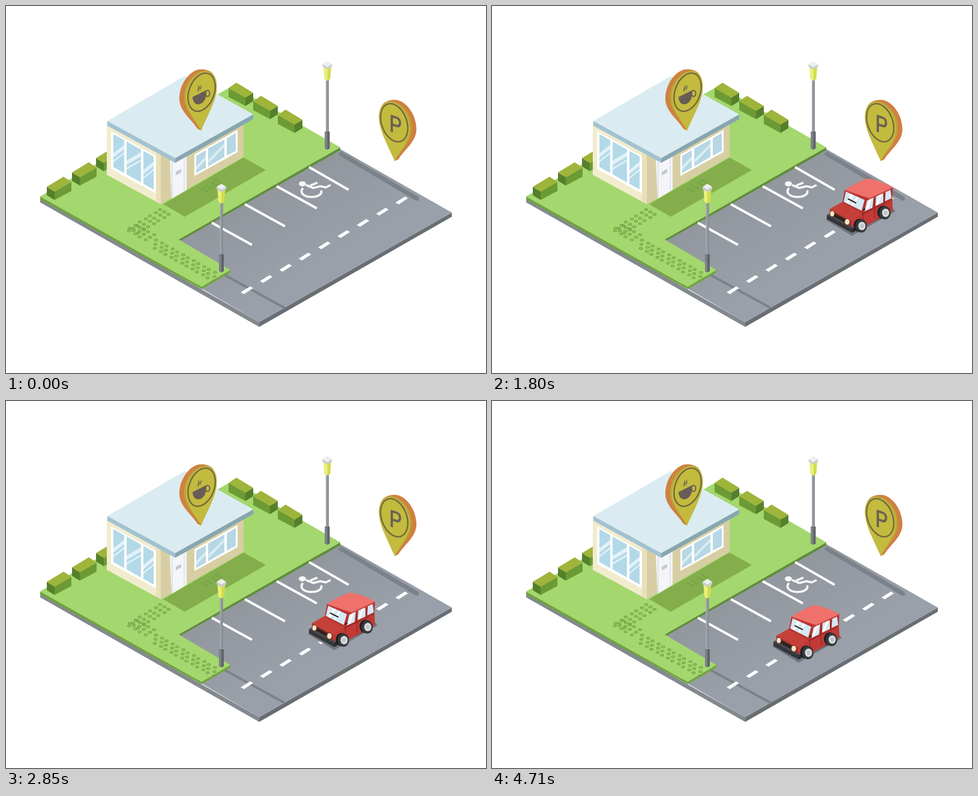
An HTML page for the animation above (4810 ms loop, 800 by 613 pixels).

```html
<!DOCTYPE html>
<html lang="en">
<head>
<meta charset="utf-8">
<title>Parking lot</title>
<style>
  html, body { margin: 0; width: 100%; height: 100%; overflow: hidden; background: #fff; }
  svg { display: block; width: 100%; height: 100%; }
</style>
</head>
<body>
<svg viewBox="0 0 800 613" preserveAspectRatio="none">
  <defs>
    <linearGradient id="asphalt" gradientUnits="userSpaceOnUse" x1="420" y1="310" x2="500" y2="450">
      <stop offset="0" stop-color="#92979e"/>
      <stop offset="1" stop-color="#9aa0a9"/>
    </linearGradient>
    <linearGradient id="pole">
      <stop offset="0" stop-color="#a9afb5"/>
      <stop offset="1" stop-color="#7d838a"/>
    </linearGradient>
    <g id="hedge">
      <path fill="#6c9a35" d="M0 0 28 16V30L0 15Z"/>
      <path fill="#557f2b" d="M28 16 41 8V22L28 30Z"/>
      <path fill="#9fb43a" d="M0 0 13 -9 41 8 28 16Z"/>
    </g>
    <g id="lamp">
      <path fill="#5f646a" d="M-4 113 0 111 4 113V141L0 143-4 141Z"/>
      <path fill="#7d8288" d="M-4 113 0 115V143L-4 141Z"/>
      <rect x="-2.5" y="25" width="5" height="88" fill="url(#pole)"/>
      <path fill="#e9f07a" d="M-6.5 4 0 8V28L-5 25Z"/>
      <path fill="#d3dc4f" d="M6.5 4 0 8V28L5 25Z"/>
      <path fill="#c9ccd0" d="M-8 0 0 5 8 0V4L0 9-8 4Z"/>
      <path fill="#eceef0" d="M-8 0 0-5 8 0 0 5Z"/>
    </g>
    <g id="pin">
      <path fill="#cf8140" d="M325 208 319 205C309 189 290 176 289 157C288 131 306 108 322 106C331 105 339 107 345 113Z"/>
      <path fill="#bda63a" d="M325 208C318 193 298 177 297 155C296 128 316 107 334 108C347 109 353 123 351 141C349 160 335 185 325 208Z"/>
      <path fill="#c3bb3e" d="M325 208C318 193 301 177 300 155C299 130 318 109 334 110C347 111 353 124 351 141C349 160 335 185 325 208Z"/>
      <ellipse cx="326" cy="144" rx="21" ry="33" transform="rotate(20 326 144)" fill="none" stroke="#74683f" stroke-width="2.4"/>
    </g>
  </defs>

  <!-- slab -->
  <path fill="#83898e" d="M57 320 422 528V536L57 328Z"/>
  <path fill="#696e73" d="M422 528 743 345V352L422 536Z"/>
  <path fill="url(#asphalt)" d="M557 239 743 345 422 528 326 472 240 390Z"/>
  <path fill="#7b8289" d="M558 243 688 319V325L683 325 553 248Z"/>
  <path fill="none" stroke="#7b8289" stroke-width="4" d="M362 448 464 504"/>

  <!-- lawn -->
  <path fill="#6fa53b" d="M57 318 326 469 374 441V445L326 473 57 323Z"/>
  <path fill="#5f8d39" d="M557 236 288 390 291 392 557 241Z"/>
  <path fill="#a4d76e" d="M57 318 378 133 557 236 288 390 374 441 326 469Z"/>
  <path fill="#84ae4c" d="M262 331 396 253 433 274 298 352Z"/>
  <g id="stones" fill="none" stroke="#74a548" stroke-width="1.4"></g>

  <use href="#hedge" transform="matrix(-1 0 0 1 109 294)"/>
  <use href="#hedge" transform="matrix(-1 0 0 1 151 270)"/>
  <use href="#hedge" transform="matrix(-1 0 0 1 191 246)"/>
  <use href="#hedge" x="371" y="137"/>
  <use href="#hedge" x="412" y="159"/>
  <use href="#hedge" x="453" y="182"/>

  <!-- cafe -->
  <path fill="#f2ecce" d="M168 194 258 244V331L168 282Z"/>
  <path fill="#d7cfa3" d="M258 244 396 190V252L258 331Z"/>
  <path fill="#e8e0b9" d="M250 246 258 250V331L250 327Z"/>
  <path fill="#fff" d="M175 209 250 251V313L175 272Z"/>
  <g id="panes" fill="#b3d9e8"></g>
  <path fill="#fff" d="M314 248 386 207V244L314 284Z"/>
  <path fill="#b7d7e5" d="M317 250 333 241V270L317 279ZM337 238 364 223V252L337 268ZM368 221 383 212V242L368 250Z"/>
  <path fill="#dceef4" d="M317 268 333 251V257L317 274ZM338 256 364 230V235L338 262Z"/>
  <path fill="#f4f5f8" d="M273 258 301 245V307L276 322Z"/>
  <path fill="none" stroke="#cfd2dc" d="M277 260V320M297 250V308"/>
  <path fill="#c3c8d2" d="M283 277 292 272V278L283 283Z"/>
  <path fill="#a3c2d1" d="M169 192 282 254V262L169 200Z"/>
  <path fill="#87a6b1" d="M282 254 412 181V189L282 262Z"/>
  <path fill="#daecf1" d="M169 192 298 117 412 181 282 254Z"/>

  <!-- markings -->
  <path fill="none" stroke="#fff" stroke-width="4" d="M505 269 571 307M451 301 518 338M398 331 465 368M343 362 410 399"/>
  <g id="dashes" fill="#fff"></g>
  <g fill="none" stroke="#f7f7f7" stroke-width="3.6" stroke-linejoin="round">
    <ellipse cx="494" cy="297" rx="6" ry="4.2" fill="#f7f7f7" stroke="none"/>
    <path d="M500 299 512 304 524 301 533 303 541 299M507 300 519 295"/>
    <path d="M495 304C488 312 497 319 509 319C520 319 528 314 525 308"/>
  </g>

  <use href="#lamp" x="535.5" y="97"/>
  <use href="#lamp" x="359" y="302"/>

  <!-- pins -->
  <use href="#pin"/>
  <g fill="#685d56">
    <path d="M311 152 333 141C335 152 331 160 325 163C317 167 311 161 311 152Z"/>
    <ellipse cx="336" cy="146" rx="3.6" ry="5" fill="none" stroke="#685d56" stroke-width="2"/>
    <path d="M320 144C317 139 323 136 320 132C326 135 320 140 320 144ZM323 142C322 137 326 135 324 131C328 135 324 138 323 142Z"/>
  </g>
  <use href="#pin" transform="matrix(-1 0 0 1 973 51)"/>
  <text transform="matrix(.78 .25 0 1 649.5 212)" text-anchor="middle" font-family="'Liberation Sans', Arial, sans-serif" font-size="40" fill="#6b6056" stroke="#6b6056">P</text>

  <!-- car -->
  <g id="car" visibility="hidden">
    <path fill="#70767c" d="M467 410 511 437 583 396 570 378 495 392Z"/>
    <path fill="#2c2c30" d="M509 410 575 382V400L514 428Z"/>
    <path fill="#c13a35" d="M508 410 527 396 578 372 579 395 567 402 536 419 511 426Z"/>
    <path fill="#9d2c2b" d="M528 399 578 374V377L528 402Z"/>
    <path fill="#c6403a" d="M474 392 495 380 528 397 510 412Z"/>
    <path fill="#a83029" d="M474 392 510 412V425L474 405Z"/>
    <path fill="#2b2422" d="M480 398 500 409V416L480 405Z"/>
    <path fill="#b9322f" d="M499 360 540 374 579 356 578 376 528 399 495 382Z"/>
    <path fill="#d3e9f5" d="M501 363 532 377 527 395 497 380Z"/>
    <path fill="#fff" d="M509 367 514 369 505 383 501 381ZM519 371 522 373 512 387 510 386Z"/>
    <path fill="#d3e9f5" d="M536 378 547 373 545 390 532 396ZM551 371 563 366V381L550 387ZM567 364 575 360 577 374 566 379Z"/>
    <path fill="#fff" d="M540 376 544 374 537 393 533 395ZM557 368 561 367 554 385 551 386Z"/>
    <path fill="none" stroke="#85211f" d="M529 398 531 416M548 374 549 408M565 366V384"/>
    <path fill="#ee716c" d="M499 360C510 353 526 344 537 341C551 343 570 350 579 356C568 364 554 370 540 375C526 370 512 365 499 360Z"/>
    <path fill="none" stroke="#c83f3b" stroke-width="1.6" d="M499 361 540 375 579 357"/>
    <path fill="#4a4b50" d="M469 402 472 400 514 423 511 426Z"/>
    <path fill="#35363a" d="M469 402 511 425V432L469 409Z"/>
    <path fill="#28292c" d="M511 425 520 420V427L511 432Z"/>
    <g fill="#f5e5c3" stroke="#7a2420">
      <ellipse cx="478" cy="400" rx="4" ry="5"/>
      <ellipse cx="503" cy="413.5" rx="4.3" ry="5.2"/>
    </g>
    <path fill="none" stroke="#2b2422" stroke-width="2" d="M504 375 518 382M529 394 533 392"/>
    <g id="wheels"></g>
  </g>
</svg>
<script>
const byId = id => document.getElementById(id);
const path = d => `<path d="${d}"/>`;

// Quad with vertical sides; its top and bottom follow the given slope.
const pane = (x, y, w, h, slope) =>
  `M${x} ${y}l${w} ${w * slope}v${h}l${-w} ${-w * slope}Z`;

const leftPanes = [[179, 18], [201, 24], [229, 17]];
byId('panes').innerHTML = leftPanes.map(([x, w]) => {
  const y = 214 + (x - 179) * 0.56;
  const glare = `M${x} ${y + 32}l${w} -14v7l${-w} 14ZM${x} ${y + 44}l${w} -14v3l${-w} 14Z`;
  return path(pane(x, y, w, 55, 0.56)) + `<path fill="#e3f2f8" d="${glare}"/>`;
}).join('');

let dashes = '';
for (let i = 0; i < 9; i++) {
  dashes += path(`M${391 + i * 32.25} ${478.3 - i * 18.75}l16 -10 5 3 -15.5 10Z`);
}
byId('dashes').innerHTML = dashes;

// Rows of small stones: start, step along, step across, counts.
function stones(x, y, [ax, ay], [bx, by], n, m) {
  let out = '';
  for (let i = 0; i < n; i++) for (let j = 0; j < m; j++) {
    const px = x + i * ax + j * bx + (i % 2) * 1.5;
    out += `<ellipse cx="${px}" cy="${y + i * ay + j * by}" rx="2.5" ry="1.5"/>`;
  }
  return out;
}
byId('stones').innerHTML =
  stones(257, 340, [-8.5, 5.2], [7, 4], 7, 3) +
  stones(219, 367, [8.8, 5], [-7, 4.3], 4, 3) +
  stones(250, 391, [8.8, 4.9], [-1, 7], 12, 3) +
  stones(351, 291, [-8, 4.8], [6, 3.4], 4, 2);

byId('wheels').innerHTML = [[526.5, 420.5], [566, 398.5]].map(([x, y]) => `
  <ellipse cx="${x - 3}" cy="${y - 1}" rx="10" ry="11" fill="#1f2023"/>
  <ellipse cx="${x}" cy="${y}" rx="9.5" ry="11" fill="#38393d"/>
  <ellipse cx="${x + 1}" cy="${y}" rx="6" ry="7" fill="#d9dbdd"/>
  <ellipse cx="${x + 1}" cy="${y}" rx="3" ry="3.6" fill="#bfc3c7"/>`).join('');

const LOOP = 4810, START = 1230, STOP = 4710, STEP = 30;
const TRAVEL = 127.5, SLOPE = 0.59;
const car = byId('car');
const origin = performance.now();

function draw(now) {
  const t = Math.floor(Math.max(0, now - origin) % LOOP / STEP) * STEP;
  const left = 1 - Math.min(1, Math.max(0, (t - START) / (STOP - START)));
  const dx = TRAVEL * left * left;
  car.setAttribute('visibility', t < START ? 'hidden' : 'visible');
  car.setAttribute('transform', `translate(${Math.round(dx)} ${-Math.round(dx * SLOPE)})`);
  requestAnimationFrame(draw);
}
draw(origin);
</script>
</body>
</html>
```
